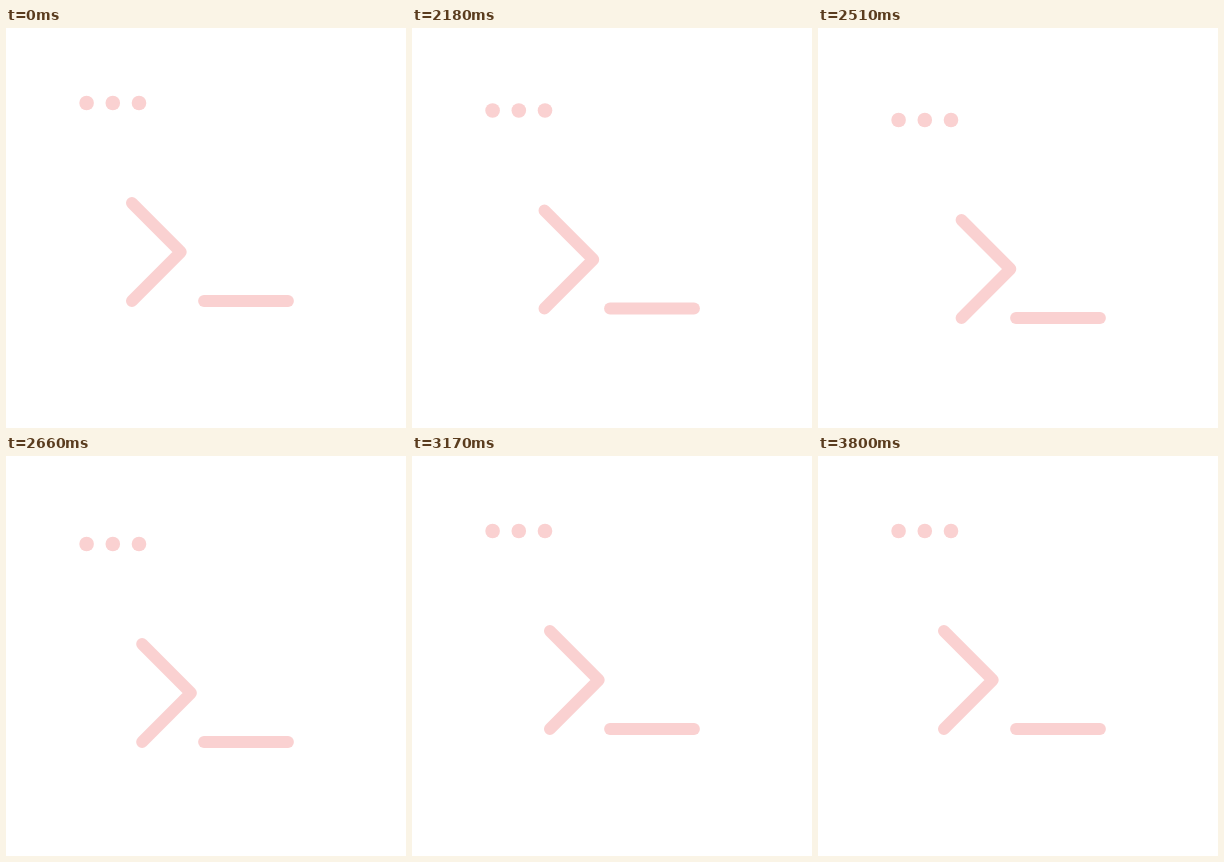
Animation, 400 px wide and 400 px high, one loop 3830 ms. Source, as an HTML page:

```html
<!DOCTYPE html>
<html lang="en">
<head>
<meta charset="utf-8">
<title>Terminal prompt</title>
<style>
  html, body { margin: 0; width: 100%; height: 100%; overflow: hidden; background: #fff; }
  svg { display: block; width: 100vw; height: 100vh; }
  .dots { fill: #fad1d1; }
  .lines { fill: none; stroke: #fad1d1; stroke-width: 11.8; stroke-linecap: round; stroke-linejoin: round; }
</style>
</head>
<body>
<svg viewBox="0 0 400 400">
  <g id="icon">
    <g class="dots">
      <circle cx="80.6" cy="75" r="7.3"/>
      <circle cx="106.8" cy="75" r="7.3"/>
      <circle cx="133" cy="75" r="7.3"/>
    </g>
    <g class="lines">
      <path id="chevron" d="M125.9 175 L174.8 224 L125.9 273"/>
      <path d="M198 273 H282"/>
    </g>
  </g>
</svg>
<script>
  const LOOP = 3830, REST = 2000, TICK = 30;
  const icon = document.getElementById('icon');
  const chevron = document.getElementById('chevron');

  const ease = (from, to, n) => {
    const p = Math.min(1, Math.max(0, (n - from) / (to - from)));
    return p * p * (3 - 2 * p);
  };
  // Rises from start to peak, then falls back to zero at end.
  const pulse = (start, peak, end, n) => ease(start, peak, n) - ease(peak, end, n);

  function draw() {
    const t = performance.now() % LOOP;
    // The motion holds each pose for one tick.
    const n = Math.max(0, Math.floor((t - REST) / TICK));
    const drop = 18 * pulse(0, 13.5, 38, n);
    const nudge = 18.5 * (pulse(0, 15, 30, n) + pulse(30, 45, 60, n));
    icon.setAttribute('transform', `translate(0 ${drop.toFixed(3)})`);
    chevron.setAttribute('transform', `translate(${nudge.toFixed(3)} 0)`);
    requestAnimationFrame(draw);
  }
  draw();
</script>
</body>
</html>
```
